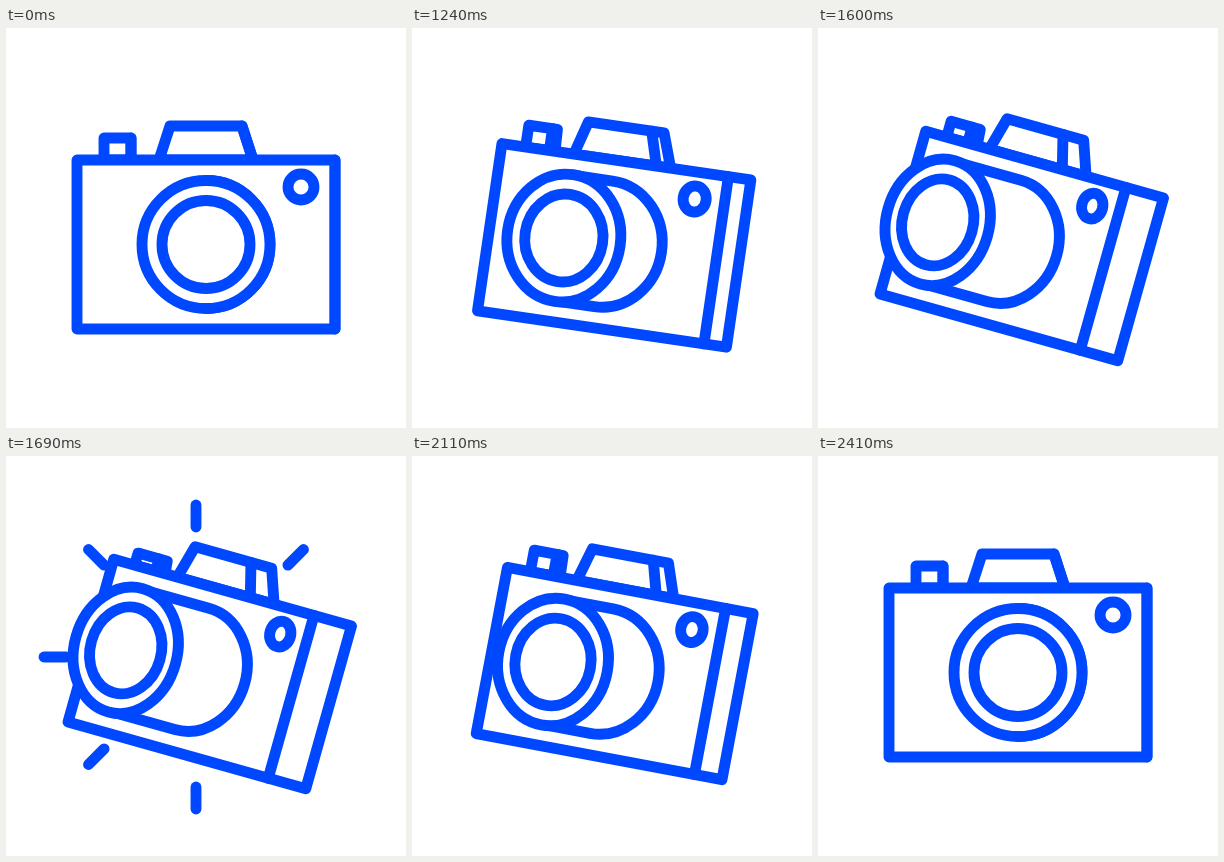
Animation, 400 px wide and 400 px high, one loop 2500 ms. Source, as an HTML page with a canvas:

```html
<!DOCTYPE html>
<html>
<head>
<meta charset="utf-8">
<title>Camera</title>
<style>
  html, body { margin: 0; width: 100%; height: 100%; overflow: hidden; background: #fff; }
  canvas { display: block; }
</style>
</head>
<body>
<canvas id="stage" width="400" height="400"></canvas>
<script>
const ctx = document.getElementById('stage').getContext('2d');
const LOOP = 2500, STEP = 30;

const progress = (t, from, to) => Math.min(1, Math.max(0, (t - from) / (to - from)));
const smooth = x => x * x * (3 - 2 * x);

// 0 = seen from the front, 1 = tilted and turned; starts with a short dip
function turnAt(t) {
  const x = progress(t, 1000, 1450);
  const turnIn = smooth(x) - 0.8 * x * (1 - x) ** 4;
  return turnIn * (1 - smooth(progress(t, 1720, 2410)) ** 2.2);
}

function line(points, closed) {
  ctx.beginPath();
  points.forEach(([x, y]) => ctx.lineTo(x, y));
  if (closed) {
    ctx.closePath();
    ctx.fill();
  }
  ctx.stroke();
}

function ring(x, y, r, squash) {
  ctx.beginPath();
  ctx.ellipse(x, y, r * squash, r, 0, 0, 2 * Math.PI);
  ctx.fill();
  ctx.stroke();
}

function drawFlash(t) {
  if (t < 1630 || t > 1830) return;
  const head = 130 + 22 * progress(t, 1600, 1690);
  const tail = 130 + 20 * progress(t, 1720, 1840);
  for (let deg = 90; deg <= 315; deg += 45) {
    const a = deg * Math.PI / 180;
    line([tail, head].map(r => [190 + r * Math.cos(a), 201 + r * Math.sin(a)]));
  }
}

// A raised box on top of the body: front outline plus its right side
function drawTop(foot, top, y, depth, front) {
  const [l, r, L, R] = [-foot, foot, -top, top].map(front);
  line([[l, -84.5], [L, y], [R + depth, y], [r + depth * 1.15, -84.5]], true);
  line([[R, y], [r, -84.5]]);
}

function drawCamera(t) {
  const turn = turnAt(t);
  const yaw = Math.max(0, turn) ** 0.85;
  const squash = 1 - 0.194 * yaw;
  const front = x => x * squash - 19.5 * yaw;
  const press = 9.5 * Math.sin(Math.PI * progress(t, 1540, 1840));

  ctx.save();
  ctx.translate(200 + 3.75 * yaw, 216.5 + 1.5 * yaw);
  ctx.rotate(turn * 15.7 * Math.PI / 180);

  drawTop(13.5, 13.5, -106.5 + press, 8.5 * yaw, x => front(x - 88.5));
  drawTop(47, 36, -118.5, 21.5 * yaw, front);

  const left = front(-129), edge = front(129), right = edge + 39 * yaw;
  line([[left, -84.5], [right, -84.5], [right, 84.5], [left, 84.5]], true);
  line([[edge, -84.5], [edge, 84.5]]);
  ring(front(95), -57.5, 13, squash);

  // The barrel reaches from its base on the body to the lens
  const base = -18.6 * yaw, lens = -87.3 * yaw, r = 64 - yaw;
  ctx.beginPath();
  ctx.moveTo(lens, -r);
  ctx.ellipse(base, 0, r * (1 - 0.13 * yaw), r, 0, -Math.PI / 2, Math.PI / 2);
  ctx.lineTo(lens, r);
  ctx.fill();
  ctx.stroke();
  ring(lens, 0, 64, squash);
  ring(lens, 0, 44, squash);
  ctx.restore();
}

function frame(now) {
  const t = Math.floor((now % LOOP - 10) / STEP) * STEP + 10;
  ctx.fillStyle = '#fff';
  ctx.fillRect(0, 0, 400, 400);
  ctx.strokeStyle = '#0048ff';
  ctx.lineWidth = 10.9;
  ctx.lineCap = ctx.lineJoin = 'round';
  drawFlash(t);
  drawCamera(t);
  requestAnimationFrame(() => frame(performance.now() - start));
}

const start = performance.now();
frame(0);
</script>
</body>
</html>
```
